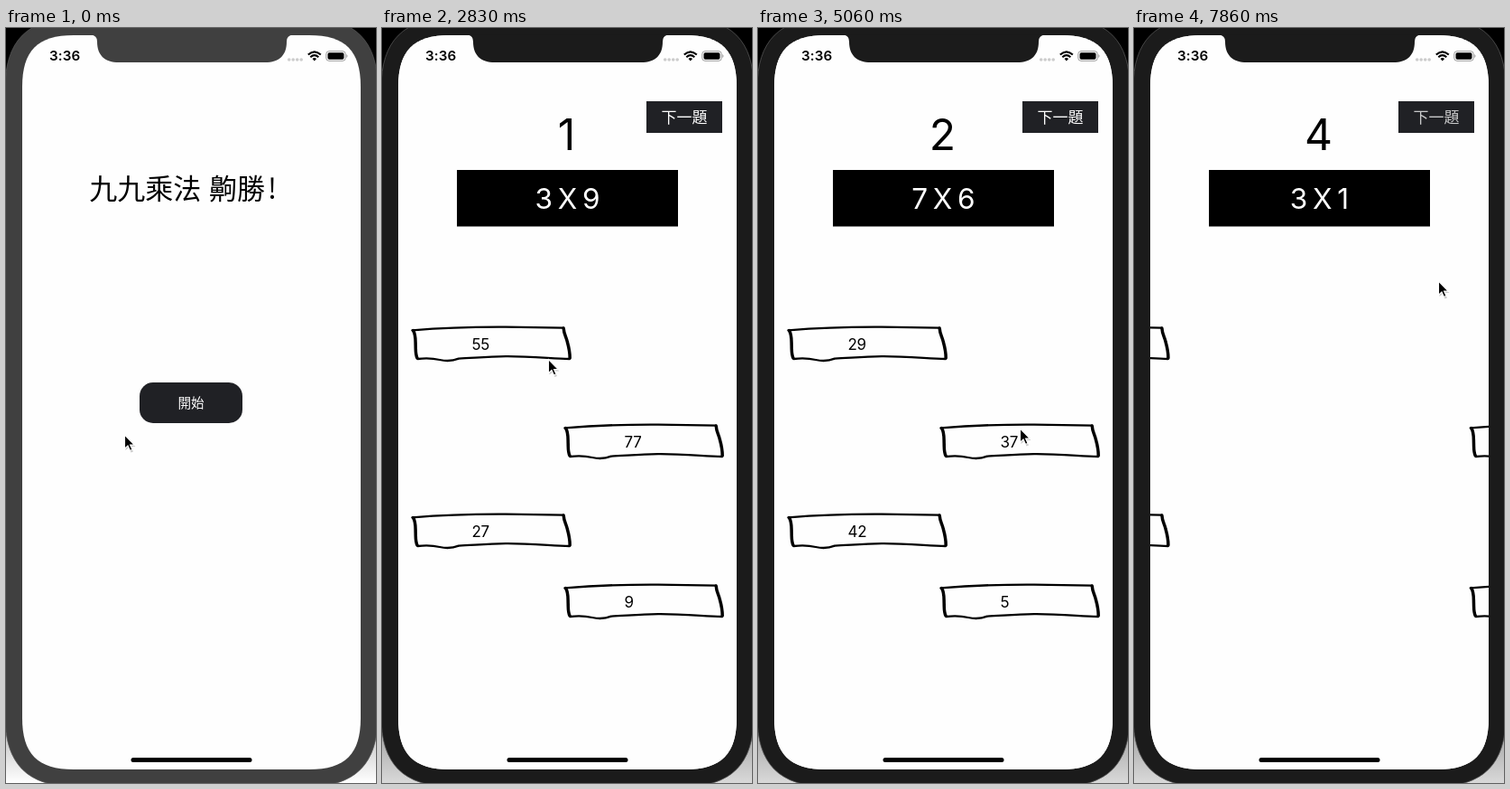
Write an HTML page that moves like this. It is 410 by 835 pixels and loops after 8 s.

```html
<!DOCTYPE html>
<html lang="zh-TW">
<head>
<meta charset="utf-8">
<title>Times table quiz</title>
<style>
  html, body { margin: 0; width: 100%; height: 100%; overflow: hidden; background: #000; }
  svg { display: block; width: 100vw; height: 100vh; }
  text { font-family: Inter, Roboto, sans-serif; }
  .zh { font-family: "Noto Sans CJK TC", "Noto Sans CJK", "Noto Sans CJK JP", sans-serif; font-weight: 400; }
  .mid { text-anchor: middle; }
</style>
</head>
<body>
<svg viewBox="0 0 410 835">
  <defs>
    <clipPath id="screen"><path class="display"/></clipPath>
    <linearGradient id="shade" x1="0" y1="0" x2="0" y2="1">
      <stop offset="0" stop-color="#999"/>
      <stop offset="1" stop-color="#fff"/>
    </linearGradient>
    <g id="frame" fill="none" stroke="#000" stroke-linecap="round" stroke-linejoin="round">
      <path stroke-width="2.3" d="M.5 4.3C28 2 68 .4 104 .6L168 1.6M175 36C150 35 128 33 104 33.2C82 33.5 66 35.2 52 35.6C46 38 38 38.6 31 37C22 35 14 35.2 6.5 36"/>
      <path stroke-width="3.5" d="M1.5 4.6C4.5 9 4 15 4.2 21C4.4 27 4 31 6 35M168.2 2C168.6 9 171 11 172.3 17C174 23 175.2 28 175.2 35"/>
    </g>
  </defs>

  <rect width="410" height="835"/>
  <rect id="floor" y="740" width="410" height="95" fill="url(#shade)"/>
  <path id="bezel" stroke="#555" stroke-width=".8"/>
  <path class="display" fill="#fefefe"/>

  <g clip-path="url(#screen)">
    <g id="home">
      <text class="zh" x="92.3" y="189" font-size="31">九九乘法<tspan x="225">齁勝</tspan><tspan x="290">!</tspan></text>
      <rect x="148" y="392" width="114" height="45" rx="15" fill="#202125"/>
      <text id="start" class="zh mid" x="205" y="420" font-size="14.6" fill="#fff">開始</text>
    </g>
    <g id="quiz">
      <rect x="18" y="8" width="375" height="812" fill="#fefefe"/>
      <text id="count" class="mid" x="204.5" y="135" font-size="48"></text>
      <rect x="293" y="81" width="84" height="35" fill="#202125"/>
      <text id="next" class="zh mid" x="335" y="105" font-size="17" fill="#fff">下一題</text>
      <g id="ask">
        <rect x="83" y="157" width="245" height="62.5"/>
        <text id="sum" class="mid" x="204.7" y="199.5" font-size="31.6" letter-spacing="-1.6" fill="#fff"></text>
      </g>
      <g id="boxes"></g>
    </g>
  </g>

  <path id="notch" d="M94 7.5Q101 8 101 15C101 30 109 38 125 38H287C303 38 311 30 311 15Q311 8 318 7.5Z"/>
  <text x="48" y="36.3" font-size="15.2" font-weight="600" letter-spacing=".15">3:36</text>
  <g fill="#ccc">
    <circle cx="313.7" cy="35" r="1.8"/><circle cx="318.2" cy="35" r="1.8"/>
    <circle cx="322.7" cy="35" r="1.8"/><circle cx="327.2" cy="35" r="1.8"/>
  </g>
  <g fill="none" stroke="#000" stroke-width="2.1">
    <path d="M334.8 29.6Q341.8 23 348.8 29.6M337.3 32.2Q341.8 28 346.3 32.2"/>
    <path d="M339.5 34L341.8 36.5L344.1 34Q341.8 32 339.5 34Z" fill="#000" stroke="none"/>
  </g>
  <rect x="354.8" y="25.7" width="21.4" height="10.6" rx="3" fill="none" stroke="#999"/>
  <rect x="356.5" y="27.3" width="18" height="7.4" rx="1.7"/>
  <path d="M377.4 29Q379.6 31 377.4 33Z" fill="#999"/>
  <rect x="138.5" y="807" width="134" height="5" rx="2.5"/>

  <g id="pointer">
    <path d="M1 2V17L4.5 14L7 19.5L9.5 18.5L7 13H12Z" opacity=".2"/>
    <path d="M0 0V15.2L3.5 12L6 17.4L8.5 16.3L6.1 11.1H10.8Z" stroke="#fff" stroke-width="1.1"/>
  </g>
</svg>
<script>
const LOOP = 8000, FIRST = 592, STEP = 148.3;
const $ = id => document.getElementById(id);
const clamp = v => Math.min(1, Math.max(0, v));
const shift = (el, x, y) => el.setAttribute('transform', `translate(${x.toFixed(2)} ${y.toFixed(2)})`);

const ACTIVE = 850, PRESENT = 1230;
const ROUNDS = [
  { at: 1282, sum: '3 X 9', answers: [55, 77, 27, 9] },
  { at: 3684, sum: '7 X 6', answers: [29, 37, 42, 5] },
  { at: 5742, sum: '7 X 6', answers: [42, 1, 18, 32] },
  { at: 7332, sum: '3 X 1', answers: [3, 12, 24, 7] }
];
const SPOTS = [[33, 330], [202, 438], [33, 537], [202, 615]];
// Touches on answers: slot, down, up
const TAPS = [[2, 2480, 2690], [0, 2940, 3030]];
// Pointer path: time, x, y
const PATH = [
  [0, 131.5, 450], [592, 131.5, 450], [850, 200, 420], [1250, 203, 418],
  [1778, 209, 420.5], [2420, 150, 553], [2680, 150, 555], [2816, 184.5, 366.5],
  [2965, 170, 354], [3260, 170, 354], [3540, 336, 106], [3700, 336, 106],
  [4299, 309, 304], [5041, 290.5, 443], [5330, 290, 446], [5634, 328, 134],
  [5720, 336, 108], [5790, 336, 110], [6375, 271.5, 290], [6700, 290, 450],
  [6900, 288, 448], [7200, 337, 106], [7350, 337, 106], [7858, 337.5, 280], [8000, 337, 292]
];

// Rectangle whose corners bend gradually: reach along the side, handle distance
function squircle(x, y, w, h, reach, hold) {
  const r = x + w, b = y + h;
  return `M${x + reach} ${y}H${r - reach}C${r - hold} ${y} ${r} ${y + hold} ${r} ${y + reach}` +
    `V${b - reach}C${r} ${b - hold} ${r - hold} ${b} ${r - reach} ${b}` +
    `H${x + reach}C${x + hold} ${b} ${x} ${b - hold} ${x} ${b - reach}` +
    `V${y + reach}C${x} ${y + hold} ${x + hold} ${y} ${x + reach} ${y}Z`;
}
$('bezel').setAttribute('d', squircle(-1, -11, 413, 850, 78, 25));
document.querySelectorAll('.display').forEach(p => p.setAttribute('d', squircle(18, 8, 375, 812, 57, 17)));

const boxes = SPOTS.map(() => {
  const g = document.createElementNS('http://www.w3.org/2000/svg', 'g');
  g.innerHTML = '<use href="#frame"/><text x="66.5" y="26" font-size="17" letter-spacing="-.3"></text>';
  $('boxes').append(g);
  return g;
});

// cubic-bezier(.42, 0, .58, 1)
function ease(x) {
  x = clamp(x);
  let lo = 0, hi = 1, s = .5;
  for (let i = 0; i < 24; i++) {
    s = (lo + hi) / 2;
    const r = 1 - s;
    if (1.26 * r * r * s + 1.74 * r * s * s + s ** 3 < x) lo = s; else hi = s;
  }
  return s * s * (3 - 2 * s);
}

function press(t, down, up, fade) {
  if (t < down) return 1;
  return t < up ? .2 : .2 + .8 * clamp((t - up) / fade);
}

// Remaining distance of the sheet that rises over the home view
function sheetDrop(t) {
  const k = (t - PRESENT) / 1000 * 16;
  return k > 8.6 ? 0 : 812 * (1 + k) * Math.exp(-k);
}

function pointerAt(t) {
  const i = Math.max(1, PATH.findIndex(p => p[0] >= t));
  const [t0, x0, y0] = PATH[i - 1], [t1, x1, y1] = PATH[i];
  const p = ease((t - t0) / (t1 - t0));
  return [x0 + (x1 - x0) * p, y0 + (y1 - y0) * p];
}

function draw(t) {
  const n = Math.max(0, ROUNDS.findLastIndex(r => t >= r.at));
  const round = ROUNDS[n];
  const active = t >= ACTIVE;
  for (const id of ['bezel', 'notch']) $(id).setAttribute('fill', active ? '#1b1b1b' : '#404040');
  $('floor').setAttribute('opacity', active ? .85 : 1);

  $('start').setAttribute('opacity', press(t, 1100, 1220, 400));
  $('quiz').setAttribute('visibility', t < PRESENT ? 'hidden' : 'visible');
  shift($('quiz'), 0, sheetDrop(Math.max(t, PRESENT)));
  $('count').textContent = n + 1;
  $('sum').textContent = round.sum;
  shift($('ask'), 0, -300 * (1 - ease((t - ROUNDS[0].at) / 570)));
  const tapped = n ? round.at : ROUNDS[1].at;
  $('next').setAttribute('opacity', press(t, tapped - 90, tapped, 750));

  const away = 375 * (1 - ease((t - round.at) / 1000));
  boxes.forEach((g, i) => {
    const [x, y] = SPOTS[i];
    shift(g, x + (i % 2 ? away : -away), y);
    g.lastChild.textContent = round.answers[i];
    const tap = TAPS.find(a => a[0] === i);
    g.setAttribute('opacity', tap ? press(t, tap[1], tap[2], 100) : 1);
  });
  shift($('pointer'), ...pointerAt(t));
}

// Time advances in even steps, as in a screen recording
function tick() {
  const t = performance.now() % LOOP;
  draw(t < FIRST ? 0 : FIRST + Math.floor((t - FIRST) / STEP) * STEP);
  requestAnimationFrame(tick);
}
tick();
</script>
</body>
</html>
```
